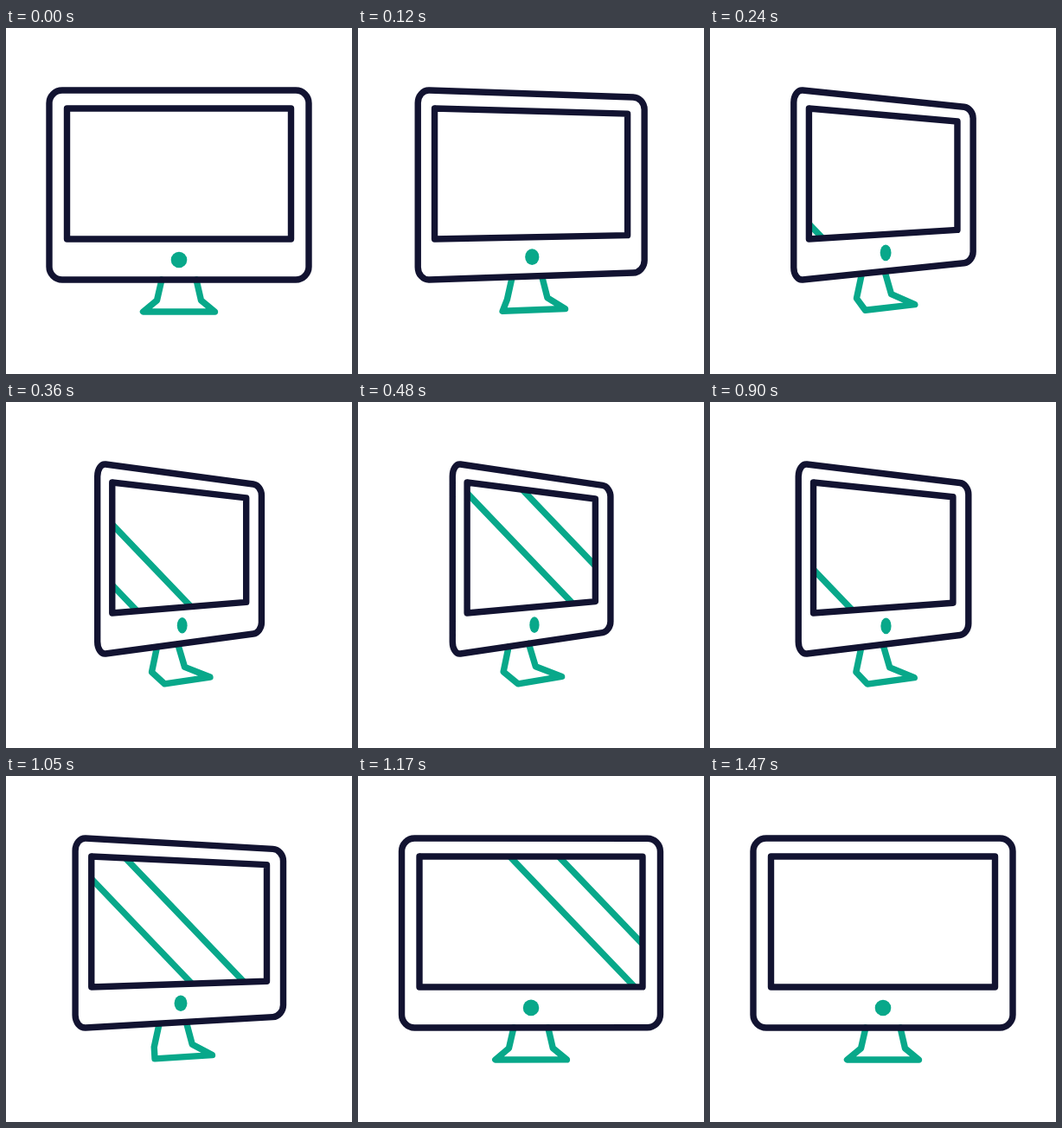
Recreate the animation shown at these times as an HTML page. Size 400 by 400 pixels, loop 1630 ms.

```html
<!DOCTYPE html>
<html lang="en">
<head>
<meta charset="utf-8">
<title>Turning monitor</title>
<style>
  html, body { margin: 0; width: 100%; height: 100%; overflow: hidden; background: #fff; }
  svg { display: block; width: 100vw; height: 100vh; }
  path { fill: none; stroke-width: 7.4; stroke-linecap: round; stroke-linejoin: round; }
  .green { stroke: #08a88a; }
  .navy { stroke: #121331; }
</style>
</head>
<body>
<svg viewBox="0 0 400 400">
  <clipPath id="glass"><path id="glassEdge"/></clipPath>
  <path id="stand" class="green"/>
  <ellipse id="dot" ry="9.3" fill="#08a88a"/>
  <g clip-path="url(#glass)"><path id="shine" class="green"/></g>
  <path id="screen" class="navy"/>
  <path id="shell" class="navy"/>
</svg>
<script>
const LOOP = 1630, STEP = 30, LAST = 1470, TURN = 600;
const EYE = 181.5;        // height of the horizon
const DEPTH = 0.00084;    // how fast a turned panel shrinks toward the horizon
const SLOPE = 1.045;      // steepness of the shine

const shell = { left: 50, right: 350, top: 72, bottom: 291, radius: 15, turned: [110.2, 291] };
const screen = { left: 70.5, right: 329.5, top: 93, bottom: 244, radius: 0, turned: [127, 273.5] };

// Rows of the stand, top to bottom: half width and y, then the turned half width, centre and y
const standRows = [
  [20, 291, 11.5, 185.5, 281],
  [25.5, 314.8, 18.5, 186.5, 308.8],
  [41.5, 328, 25, 210.5, 321.5]
];

const set = (id, attrs) => {
  for (const name in attrs) document.getElementById(id).setAttribute(name, attrs[name]);
};
const clamp = v => Math.min(1, Math.max(0, v));
const mix = (a, b, p) => a + (b - a) * p;
const smooth = v => v * v * (3 - 2 * v);

// cubic-bezier(1/3, 0, 0, 1), solved by bisection
function ease(x) {
  let lo = 0, hi = 1;
  for (let i = 0; i < 30; i++) {
    const u = (lo + hi) / 2;
    if (u * (1 - u) ** 2 + u ** 3 < x) lo = u; else hi = u;
  }
  return smooth(lo);
}

// Rounded rectangle swung about its left side
function panel({ left, right, top, bottom, radius, turned }, p) {
  const project = ([x, y]) => [
    mix(x, mix(...turned, (x - left) / (right - left)), p),
    y + (EYE - y) * DEPTH * (x - left - radius) * p
  ];
  const corners = [[left, top], [right, top], [right, bottom], [left, bottom]];
  const parts = corners.map((corner, i) => {
    const toward = (side, dist) => project(corner.map((v, k) =>
      v + Math.sign(corners[(i + side) % 4][k] - v) * dist));
    const handle = radius * 0.45;
    return `${toward(3, radius)}C${toward(3, handle)} ${toward(1, handle)} ${toward(1, radius)}`;
  });
  return `M${parts.join('L')}Z`;
}

function stand(p) {
  const side = s => standRows.map(([half, y, turnedHalf, cx, turnedY]) => [
    mix(200 + s * half, cx + s * turnedHalf, p),
    mix(y, turnedY - s * turnedHalf * 0.17, p)
  ]);
  return 'M' + [...side(-1), ...side(1).reverse()].join('L');
}

// A pair of diagonals crossing the glass from lower left to upper right
function sweep(t, start, duration, gap) {
  const lead = mix(170, -316, smooth(clamp((t - start) / duration)));
  return [lead, lead + gap].map(y => `M0 ${y}L400 ${y + 400 * SLOPE}`).join('');
}

function draw(t) {
  const p = ease(clamp(1 - Math.abs(t - TURN) / TURN));
  const gap = mix(59, 71, p);
  const glass = panel(screen, p);
  set('stand', { d: stand(p) });
  set('screen', { d: glass });
  set('glassEdge', { d: glass });
  set('shell', { d: panel(shell, p) });
  set('shine', { d: sweep(t, 64, 780, gap) + sweep(t, 646, 864, gap) });
  set('dot', { cx: mix(200, 204, p), cy: mix(268, 257.5, p), rx: mix(9.3, 5.6, p) });
}

const origin = performance.now();
function tick() {
  const t = (performance.now() - origin) % LOOP;
  draw(Math.min(LAST, Math.floor(t / STEP) * STEP));
  requestAnimationFrame(tick);
}
tick();
</script>
</body>
</html>
```
